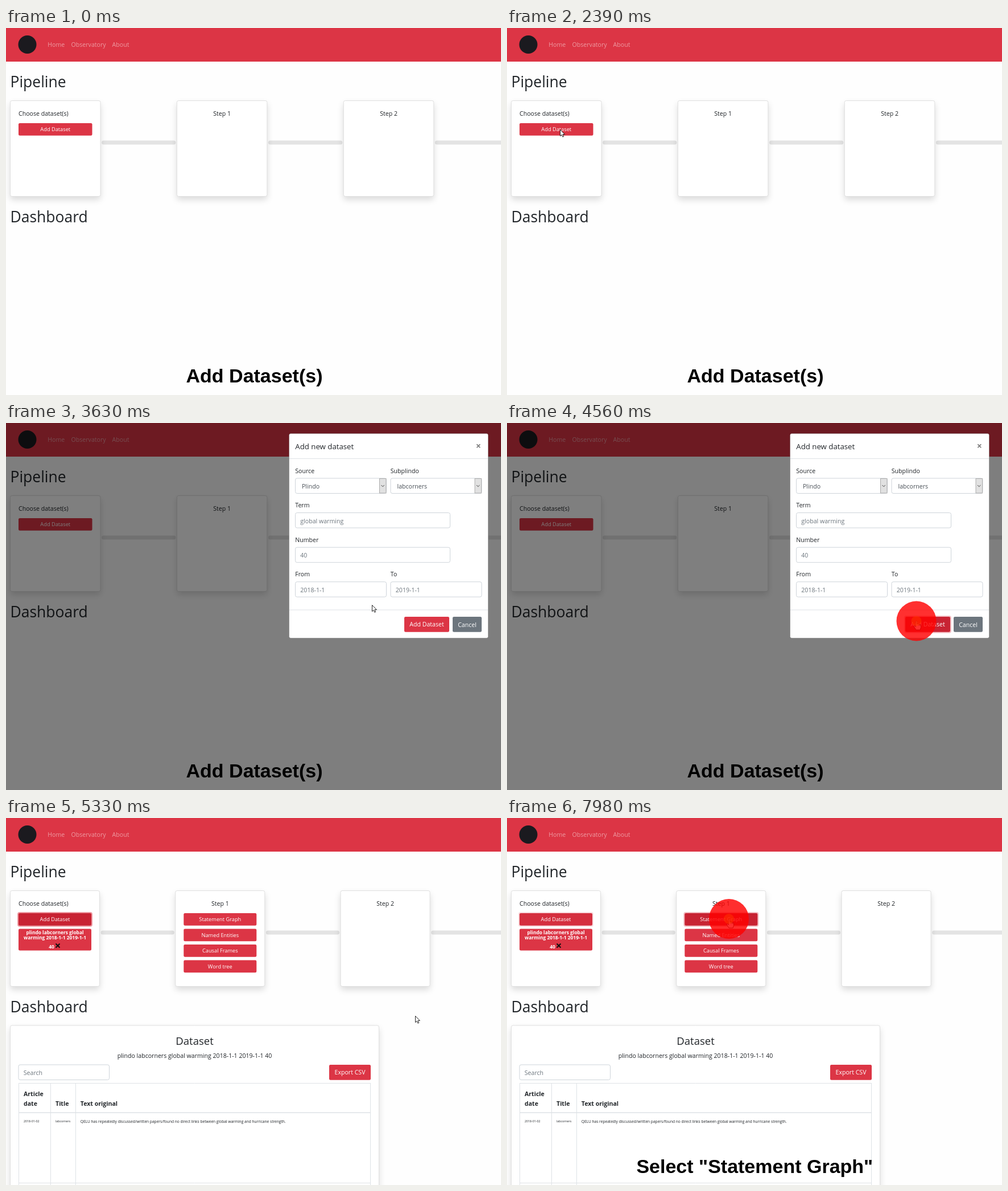
These frames come from a looping animation (870 px wide and 644 px high, 8000 ms). An HTML page with a canvas:

```html
<!DOCTYPE html>
<html lang="en">
<head>
<meta charset="utf-8">
<title>Pipeline demo</title>
<style>
  html, body { margin: 0; width: 870px; height: 644px; overflow: hidden; background: #fff; }
  canvas { display: block; }
</style>
</head>
<body>
<canvas id="stage" width="870" height="644"></canvas>
<script>
const W = 870, H = 644, LOOP = 8000;
const stage = document.getElementById('stage').getContext('2d');
const layerCanvas = document.createElement('canvas');
layerCanvas.width = W;
layerCanvas.height = H;
const layer = layerCanvas.getContext('2d');
let g = stage;

const RED = [220, 53, 69], DARK_RED = [200, 35, 51];
const INK = '#212529', MUTED = '#6c757d', LINE = '#dee2e6';
const SITE = 'Plindo', FORUM = 'labcorners';
const QUERY = 'global warming 2018-1-1 2019-1-1 40';

// Key moments in ms
const OPEN = 2420, CLOSE = 4600, RELAYOUT = 4900;
const HOVER_ADD = 4180, CLICK_ADD = 4470, HOVER_GRAPH = 7360, CLICK_GRAPH = 7880;

const clamp = v => Math.max(0, Math.min(1, v));
const ramp = (t, start, length = 150) => clamp((t - start) / length);
const easeOut = u => 1 - Math.pow(1 - u, 1.6);
const easeInOut = u => (1 - Math.cos(Math.PI * u)) / 2;
const mix = (a, b, u) => `rgb(${a.map((v, i) => Math.round(v + (b[i] - v) * u))})`;

// Sizes are in px of the interface font; Open Sans runs a little wider.
function text(s, x, y, size = 11.2, color = INK, align = 'left', weight = 400) {
  g.font = `${weight} ${size * 0.945}px "Open Sans", "Noto Sans", sans-serif`;
  g.textAlign = align;
  g.fillStyle = color;
  g.fillText(s, x, y);
}

function box(x, y, w, h, r, fill, stroke) {
  g.beginPath();
  g.roundRect(x, y, w, h, r);
  if (fill) { g.fillStyle = fill; g.fill(); }
  if (stroke) { g.strokeStyle = stroke; g.lineWidth = 1; g.stroke(); }
}

function line(x1, y1, x2, y2, color = LINE, width = 1) {
  g.beginPath();
  g.moveTo(x1, y1);
  g.lineTo(x2, y2);
  g.strokeStyle = color;
  g.lineWidth = width;
  g.stroke();
}

function shape(points) {
  g.beginPath();
  points.forEach(([x, y]) => g.lineTo(x, y));
  g.closePath();
}

function disc(x, y, r, color) {
  g.beginPath();
  g.arc(x, y, r, 0, 7);
  g.fillStyle = color;
  g.fill();
}

function button(label, x, y, w, h, size, hot = 0, ring = 0) {
  if (ring > 0) box(x - 2, y - 2, w + 4, h + 4, 4, `rgba(220,53,69,${0.5 * ring})`);
  box(x, y, w, h, 2.2, mix(RED, DARK_RED, hot));
  text(label, x + w / 2, y + h / 2 + size * 0.37, size, '#fff', 'center');
}

function card(x, y, w, h) {
  g.save();
  g.shadowColor = 'rgba(0,0,0,.15)';
  g.shadowBlur = 11.2;
  g.shadowOffsetY = 5.6;
  box(x, y, w, h, 3, '#fff');
  g.restore();
  box(x, y, w, h, 3, null, '#dfdfdf');
}

function input(label, x, y, w) {
  box(x, y, w, 26.5, 3, '#fff', '#ced4da');
  text(label, x + 8.8, y + 18.2, 11.2, MUTED);
}

function select(label, x) {
  box(x, 97, 160, 26.5, 3, '#fff', '#ced4da');
  text(label, x + 11.5, 115.2, 11.2, '#495057');
  g.fillStyle = '#e1e1e1';
  g.fillRect(x + 148, 97.5, 11.5, 25.5);
  g.strokeStyle = '#adadad';
  g.lineWidth = 1;
  g.strokeRect(x + 148, 97.5, 11.5, 25.5);
  g.beginPath();
  g.moveTo(x + 151, 109);
  g.lineTo(x + 153.7, 111.7);
  g.lineTo(x + 156.4, 109);
  g.strokeStyle = '#444';
  g.stroke();
}

function drawNav() {
  g.fillStyle = mix(RED, RED, 0);
  g.fillRect(0, 0, W, 59);
  disc(37.5, 29, 16, '#1b1a1f');
  [['Home', 73.3], ['Observatory', 114.6], ['About', 186.6]].forEach(
    ([s, x]) => text(s, x, 33.3, 11.2, 'rgba(255,255,255,.5)'));
}

function drawPipeline(t, loaded, narrow) {
  const pitch = narrow ? 290.3 : 292.9;
  const cw = narrow ? 157 : 158.5;
  const bw = cw - 29;
  text('Pipeline', 7.5, 104, 28);
  for (let i = 0; i < 3; i++) {
    const x = 7.5 + i * pitch;
    box(x + cw + 2, 197.5, pitch - cw - 4, 7, 3.5, '#e3e3e3');
    card(x, 127.5, cw, 168);
    if (i) text('Step ' + i, x + cw / 2, 154.3, 11.2, INK, 'center');
  }
  text('Choose dataset(s)', 22, 154.3);
  const focus = ramp(t, RELAYOUT) - ramp(t, CLICK_GRAPH);
  button('Add Dataset', 22, 167, bw, 21.7, 9.8, focus, focus);
  if (!loaded) return;

  box(22, 194.5, bw, 38, 2.2, mix(RED, RED, 0));
  const mid = 22 + bw / 2;
  const tag = (s, x, y) => text(s, x, y, 8.9, '#fff', 'center', 700);
  tag(`${SITE.toLowerCase()} ${FORUM} global`, mid, 204.2);
  tag('warming 2018-1-1 2019-1-1', mid, 213);
  tag('40', mid - 6, 229);
  line(mid + 1.5, 220.5, mid + 8.5, 227.5, '#111', 2);
  line(mid + 8.5, 220.5, mid + 1.5, 227.5, '#111', 2);

  ['Statement Graph', 'Named Entities', 'Causal Frames', 'Word tree'].forEach((s, i) => {
    const hot = i ? 0 : ramp(t, HOVER_GRAPH);
    const ring = i ? 0 : ramp(t, CLICK_GRAPH);
    button(s, 22 + pitch, 167 + i * 27.5, bw, 21.7, 9.8, hot, ring);
  });
}

function drawDashboard(loaded, narrow) {
  text('Dashboard', 7.5, 341, 28);
  if (!loaded) return;
  const right = narrow ? 641 : 647;
  const mid = (right + 22) / 2;
  card(7.5, 364, right + 7, 300);
  text('Dataset', mid, 398.3, 19.6, INK, 'center');
  text(`${SITE.toLowerCase()} ${FORUM} ${QUERY}`, mid, 420.8, 11.2, INK, 'center');
  input('Search', 22, 433, 159.5);
  button('Export CSV', right - 73, 433, 73, 26.7, 11.2);

  line(22, 465.5, right, 465.5);
  line(22, 517, right, 517, LINE, 1.6);
  line(22, 640.5, right, 640.5);
  [22.5, 78.5, 122.5, right - 0.5].forEach(x => line(x, 465, x, H));
  [['Article', 31, 487.6], ['date', 31, 504.6], ['Title', 87, 504.6], ['Text original', 130.8, 504.6]]
    .forEach(([s, x, y]) => text(s, x, y, 11.2, INK, 'left', 700));
  text('2018-01-02', 31, 533.6, 5.6);
  text(FORUM, 87, 533.6, 5.6);
  text('QELU has repeatedly discussed/written papers/found no direct links between ' +
    'global warming and hurricane strength.', 130.8, 534.8, 7);
}

function drawModal(t) {
  box(497.5, 18.5, 350, 359, 3.2, '#fff', 'rgba(0,0,0,.2)');
  text('Add new dataset', 508.3, 46.3, 14);
  text('×', 830.3, 46.3, 17, '#7f7f7f', 'center', 700);
  line(498, 62.5, 847, 62.5);
  line(498, 328, 847, 328);
  [['Source', 508.3, 87.5], ['Sub' + SITE.toLowerCase(), 675.8, 87.5], ['Term', 508.3, 148],
    ['Number', 508.3, 208.8], ['From', 508.3, 269.4], ['To', 675.8, 269.4]]
    .forEach(([s, x, y]) => text(s, x, y));
  select(SITE, 508.5);
  select(FORUM, 676);
  input('global warming', 508.5, 157.5, 272);
  input('40', 508.5, 218.2, 272);
  input('2018-1-1', 508.5, 278.7, 160);
  input('2019-1-1', 676, 278.7, 160);
  button('Add Dataset', 700, 340, 79, 26.7, 11.2, ramp(t, HOVER_ADD), ramp(t, CLICK_ADD));
  box(785, 340, 51, 26.7, 2.2, MUTED);
  text('Cancel', 810.5, 357.5, 11.2, '#fff', 'center');
}

function drawOverlay(t) {
  const gone = ramp(t, CLOSE);
  const shade = 0.5 * (ramp(t, OPEN, 120) - gone);
  if (shade > 0) {
    g.fillStyle = `rgba(0,0,0,${shade})`;
    g.fillRect(0, 0, W, H);
  }
  const alpha = ramp(t, 2545) - gone;
  if (alpha <= 0) return;
  const shift = -35 * (1 - easeOut(ramp(t, 2545, 300)) + easeOut(ramp(t, CLOSE, 300)));
  layer.clearRect(0, 0, W, H);
  g = layer;
  drawModal(t);
  g = stage;
  g.globalAlpha = alpha;
  g.drawImage(layerCanvas, 0, shift);
  g.globalAlpha = 1;
}

function drawCaption(t) {
  if (t >= 5330 && t < 6110) return;
  const first = t < 5330;
  g.font = 'bold 34px "Liberation Sans", Arial, sans-serif';
  g.textAlign = 'center';
  g.fillStyle = '#000';
  g.fillText(first ? 'Add Dataset(s)' : 'Select "Statement Graph"', first ? 436.5 : 435.3, first ? 622 : 623);
}

const MOVES = [
  { start: 720, length: 1060, path: [[439, 606], [134, 224], [93.5, 178.5]] },
  { start: 2525, length: 1430, path: [[93.5, 178.5], [437, 278], [642, 319], [719.5, 347.5]] },
  { start: 6080, length: 1183, path: [[719.5, 347.5], [454, 205], [390.5, 177.5]] }
];

function cursorAt(t) {
  const move = MOVES.filter((m, i) => !i || t >= m.start).pop();
  const path = move.path, x0 = path[0][0], x1 = path[path.length - 1][0];
  const x = x0 + (x1 - x0) * easeInOut(ramp(t, move.start, move.length));
  let i = 0;
  while (i < path.length - 2 && (x - path[i + 1][0]) * (x1 - x0) > 0) i++;
  const [a, b] = [path[i], path[i + 1]];
  return [x, a[1] + (b[1] - a[1]) * (x - a[0]) / (b[0] - a[0])];
}

const ARROW = [[0, 0], [0, 11.2], [2.6, 8.8], [4.4, 12.7], [6.2, 11.9], [4.5, 8.1], [8, 8.1]];
const HAND = [[-1.2, 0.6], [0, 0], [1.2, 0.6], [1.3, 5.2], [3.6, 5], [4, 5.7], [6, 5.6], [6.4, 6.4],
  [7.7, 6.7], [8, 11], [6.6, 15.5], [-0.4, 15.5], [-3.8, 10.5], [-4.2, 8.4], [-3, 8], [-1.3, 10]];

function drawCursor(t) {
  if (t < 760) return;
  const [x, y] = cursorAt(t);
  const hand = (t >= HOVER_ADD && t < 5330) || t >= HOVER_GRAPH;
  g.save();
  g.translate(x, y);
  g.lineJoin = 'round';
  shape(hand ? HAND : ARROW);
  g.fillStyle = '#fff';
  g.fill();
  g.strokeStyle = '#111';
  g.lineWidth = 0.9;
  g.stroke();
  if (hand) [3.6, 6].forEach(k => line(k, 6, k, 8.5, '#111', 0.7));
  g.restore();
}

function drawClick(t, start, x, y, hold) {
  const fade = 1 - ramp(t, start + hold, 100);
  if (t < start || fade <= 0) return;
  const r = 15 + 20 * ramp(t, start, 80);
  disc(x, y, r, `rgba(255,0,0,${0.82 * fade})`);
  disc(x, y, 9, `rgba(255,60,0,${0.45 * fade})`);
}

function draw(t) {
  const loaded = t >= CLOSE - 10;
  const narrow = t >= RELAYOUT;
  g.fillStyle = '#fefefe';
  g.fillRect(0, 0, W, H);
  drawNav();
  drawPipeline(t, loaded, narrow);
  drawDashboard(loaded, narrow);
  drawOverlay(t);
  drawCaption(t);
  drawCursor(t);
  drawClick(t, 2000, 93.5, 178.5, 130);
  drawClick(t, CLICK_ADD, 719.5, 347.5, 90);
  drawClick(t, CLICK_GRAPH, 390, 177, 130);
}

const begin = performance.now();
function tick() {
  draw((performance.now() - begin) % LOOP);
  requestAnimationFrame(tick);
}
tick();
</script>
</body>
</html>
```
